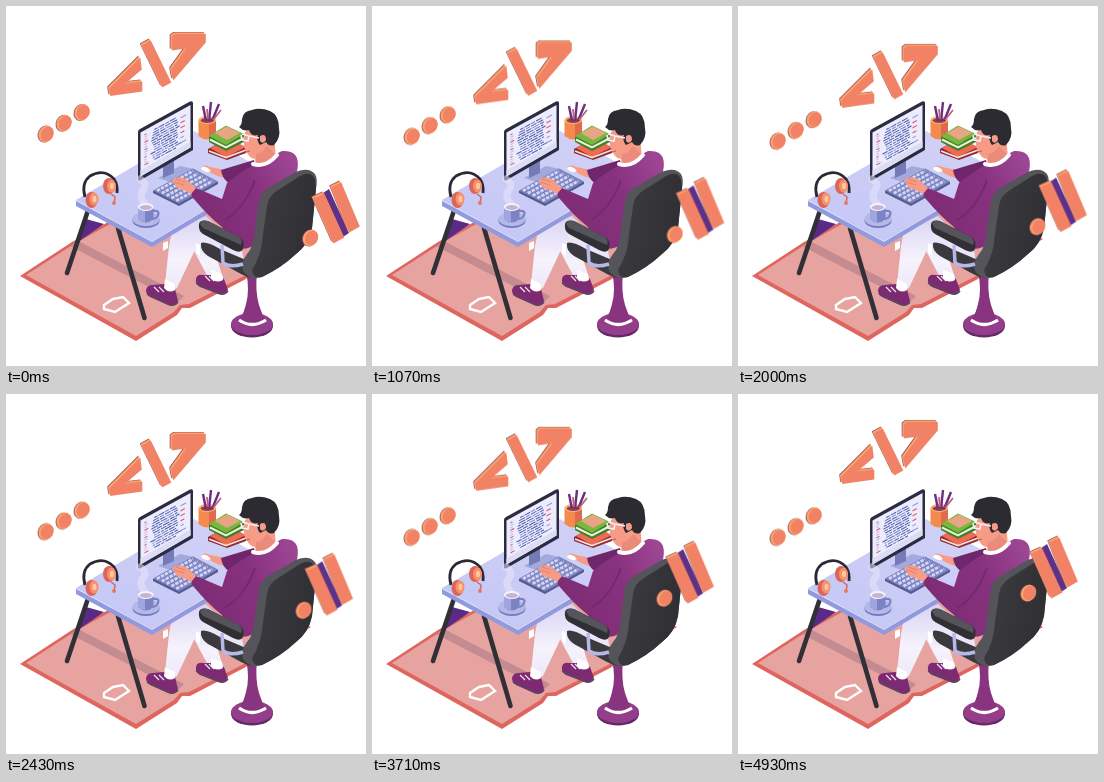
An HTML page that plays this animation: 360x360 px, repeating every 5 s.

```html
<!DOCTYPE html>
<html lang="en">
<head>
<meta charset="utf-8">
<title>Developer at a desk</title>
<style>
  html, body { margin: 0; width: 100%; height: 100%; overflow: hidden; background: #fff; }
  svg { display: block; width: 100vw; height: 100vh; }
  .tag, .dots, .bars { animation: 5s infinite; }
  .tag { animation-name: bob; }
  .dots { animation-name: sink; }
  .bars { animation-name: rise; }
  @keyframes bob {
    0% { transform: none; animation-timing-function: cubic-bezier(.39, .575, .565, 1); }
    46% { transform: translateY(12px); animation-timing-function: cubic-bezier(.45, 0, .72, .82); }
    96%, 100% { transform: none; }
  }
  @keyframes sink {
    0% { transform: none; animation-timing-function: cubic-bezier(.364, 0, .636, 1); }
    86% { transform: translateY(16px); animation-timing-function: ease-in; }
    100% { transform: translateY(15.2px); }
  }
  @keyframes rise {
    0% { transform: none; animation-timing-function: cubic-bezier(.364, 0, .636, 1); }
    100% { transform: translate(-14px, -33px); }
  }
</style>
</head>
<body>
<svg viewBox="0 0 360 360" xmlns="http://www.w3.org/2000/svg">
  <defs>
    <linearGradient id="desk" x1="0" y1="1" x2="1" y2="0">
      <stop offset="0" stop-color="#c3c7f5"/><stop offset="1" stop-color="#d3d2f7"/>
    </linearGradient>
    <linearGradient id="shirt" x1="0" y1=".7" x2="1" y2=".2">
      <stop offset="0" stop-color="#7c2b72"/><stop offset=".6" stop-color="#88327f"/><stop offset="1" stop-color="#9d4694"/>
    </linearGradient>
    <linearGradient id="chair" x1="0" y1="0" x2="1" y2=".3">
      <stop offset="0" stop-color="#3d3c41"/><stop offset="1" stop-color="#302f34"/>
    </linearGradient>
    <linearGradient id="leg" x1="0" y1="0" x2="0" y2="1">
      <stop offset="0" stop-color="#d9d3f3"/><stop offset=".6" stop-color="#f6f3fd"/><stop offset="1" stop-color="#eee7f7"/>
    </linearGradient>
  </defs>

  <g id="rug">
    <path d="M14 270L66 236L189 168L305 233L238 274L184 302L176 302L171 309L130 335Z" fill="#df665f"/>
    <path d="M20 269L68 238L189 171L299 232L236 271L183 298L174 299L168 306L130 330Z" fill="#e6a3a0"/>
    <path d="M64 240L72 235L178 290L172 296Z" fill="#c48b90"/>
    <path d="M98 299L107 293L117 291L123 297L109 306L98 303Z" fill="none" stroke="#fff" stroke-width="2.4"/>
  </g>

  <g id="frame" fill="none" stroke="#313037" stroke-width="4.6" stroke-linecap="round">
    <path d="M80 213L98 218L72 236Z" fill="#5b2a86" stroke="none"/>
    <path d="M81.500 206L61 267M112 222L138.500 312"/>
  </g>

  <g id="legs">
    <path d="M188 226L222 232L210 250L217 272Q210 279 203 273L187 243Z" fill="url(#leg)"/>
    <path d="M166 224L200 210L216 226Q194 238 188 246L171 282Q164 285 159 278L163 240Z" fill="url(#leg)"/>
    <path d="M157 237v8l5-3v-7zM190 237v10l4 3v-11z" fill="#fff"/>
  </g>
  <g id="shoes" fill="#7d2a72">
    <path d="M140 284Q141 279 147 279L158 278L169 283L172 295Q169 301 162 299L144 291Q140 289 140 284Z"/>
    <path d="M190 273Q191 268 197 269L207 269L218 273L222 284Q219 289 212 288L194 281Q189 278 190 273Z"/>
    <path d="M141 288L162 298Q168 301 172 296M190 277L212 287Q218 290 222 285" fill="none" stroke="#59455f" stroke-width="1.600"/>
    <path d="M148 281l5 5M153 281l5 5M199 270l5 5M203 270l5 5" stroke="#f3e6f3" stroke-width="1.200"/>
    <path d="M159 273L169 278L169 284Q163 288 158 282ZM205 264L216 268L217 274Q210 278 205 272Z" fill="#fff"/>
  </g>

  <g id="table">
    <path d="M70 194L146 235L262 166V172L146 241L70 200Z" fill="#929adf"/>
    <path d="M70 194L188 125L262 166L146 235Z" fill="url(#desk)"/>
    <path d="M70 194.500L146 235.500L262 166.500" fill="none" stroke="#e2e4fb" stroke-width="1"/>
  </g>

  <g id="monitor">
    <path d="M152 172L174 160L188 163L164 176Z" fill="#a3a9dc"/>
    <path d="M157 160L168 154V167L157 172Z" fill="#747cb7"/>
    <path d="M132 126Q132 124 134 123L184 95.500Q187 94.500 187 97V144L134 174.500Q132 175 132 173Z" fill="#2b2c42"/>
    <path d="M134.500 126.500L184.500 99V141.500L134.500 170.500Z" fill="#ececfc"/>
    <path d="M134.500 164.500L184.500 135.500V141.500L134.500 170.500Z" fill="#dcdcf4"/>
    <g id="code" transform="matrix(1 -.54 0 1 134.500 126)" stroke-width="1.100" fill="none"/>
  </g>

  <g id="keyboard">
    <path d="M147 185L187 163L212 176V178L173 200L147 187Z" fill="#555b91"/>
    <path d="M147 184.500L187 162.500L212 175.500L173 197.500Z" fill="#7d84bf"/>
    <g id="keys" stroke="#d3d6f6" stroke-width="2.700" stroke-dasharray="3.400 1.100"/>
  </g>

  <g id="phones">
    <path d="M79 191Q75 177 84 170Q98 162 108 173Q112 179 111 187" fill="none" stroke="#2c2937" stroke-width="2.800"/>
    <g fill="#d9655c"><ellipse cx="85.500" cy="194" rx="6" ry="8"/><ellipse cx="103" cy="180" rx="6" ry="8"/></g>
    <g fill="#f99068"><ellipse cx="88" cy="193" rx="4.500" ry="6.500"/><ellipse cx="105.500" cy="180" rx="4.500" ry="6.500"/></g>
    <g fill="#ffc8a4"><ellipse cx="88.500" cy="193" rx="2" ry="3.200"/><ellipse cx="106" cy="180" rx="2" ry="3.200"/></g>
    <path d="M105 188L109 191L108 198" fill="none" stroke="#d9655c" stroke-width="1.500"/>
    <circle cx="108" cy="197" r="2" fill="#e9775f"/>
  </g>

  <g id="cup">
    <path d="M139 198Q132 190 137 184T134 173" fill="none" stroke="#e9e6f9" stroke-width="7" stroke-linecap="round" opacity=".55"/>
    <ellipse cx="140" cy="214.500" rx="13.500" ry="7.500" fill="#6f77b8"/>
    <ellipse cx="140" cy="213" rx="13.500" ry="7.300" fill="#b3b8e8"/>
    <path d="M147 205Q154 204 152 209Q151 213 145 213" fill="none" stroke="#7a82c0" stroke-width="2.200"/>
    <path d="M132 201V213Q140 220 147.500 213V201Z" fill="#7b83c4"/>
    <path d="M132 201V213Q135 216 139 216V201Z" fill="#9fa6df"/>
    <ellipse cx="139.800" cy="201" rx="8" ry="4" fill="#f3f3fe"/>
    <ellipse cx="139.800" cy="201.500" rx="6" ry="2.600" fill="#c6b3d2"/>
  </g>

  <g id="pencils">
    <path d="M192.500 114V130Q201 137 210 130V114Z" fill="#f58a4f"/>
    <path d="M203 116H210V130Q207 133 203 133.500Z" fill="#df6a4c"/>
    <ellipse cx="201.200" cy="114" rx="8.800" ry="4" fill="#ffb067"/>
    <ellipse cx="201.200" cy="114.500" rx="6.500" ry="2.500" fill="#8c3f55"/>
    <path d="M200 115L197 100M203 115L205 96M206 115L213 98" stroke="#6a2f83" stroke-width="2.400"/>
    <path d="M202 113L201 103M207 114L215 104" stroke="#c0607a" stroke-width="1.800"/>
  </g>
  <g id="books">
    <path d="M202 143L222 132L240 142V147L221 154L202 147Z" fill="#8f2a38"/>
    <path d="M204 142L222 132L240 141L220 151Z" fill="#ef6b52"/>
    <path d="M203 145L220 151.500L240 144" fill="none" stroke="#fbe1d4" stroke-width="1.800"/>
    <path d="M203 131L220 120L238 129V136L220 145L203 136Z" fill="#3f7f2b"/>
    <path d="M203 130L220 119.500L238 128L220 139Z" fill="#78b83e"/>
    <path d="M204 133.500L220 141.500L238 132" fill="none" stroke="#eaf3d2" stroke-width="2"/>
    <path d="M209 127L221 120.500L234 127L221 134Z" fill="#e8a585"/>
  </g>

  <g id="person">
    <path d="M196 161Q199 158 204 161L219 164L218 172Q207 169 201 164Z" fill="#f69b86"/>
    <path d="M195 163Q196 159 202 162L205 165Q200 168 195 163Z" fill="#fff"/>
    <path d="M215 164L248 154L252 170L224 178Q216 173 215 164Z" fill="#6f266b"/>
    <path d="M246 160Q250 154 262 152L276 145Q288 144 291 152Q295 166 280 190L250 238Q238 247 224 239L216 221Q203 211 187 192Q183 187 190 182L216 193L221 177Q236 165 246 160Z" fill="url(#shirt)"/>
    <path d="M249 174Q239 202 219 214" fill="none" stroke="#722a6e" stroke-width="2"/>
    <path d="M166 174Q172 169 180 173L190 182L185 188Q179 184 171 182Z" fill="#f69b86"/>
    <path d="M168 176L178 179M170 173L179 176" stroke="#de7b70" stroke-width=".8"/>
    <path d="M239 126Q236 139 240 145Q243 152 249 153L250 159Q260 163 270 152L268 130L252 119Z" fill="#f69b86"/>
    <path d="M250 148Q257 147 261 140L269 148Q263 158 250 158Z" fill="#ea8b7b"/>
    <path d="M247 158Q260 162 271 149" fill="none" stroke="#fff" stroke-width="4" stroke-linecap="round"/>
    <path d="M233 121Q236 119 236 113Q237 105 246 104Q254 101 264 105Q273 109 273 122Q275 132 268 139Q263 141 260 136L254 139Q250 134 252 129Q245 131 243 124Q238 126 233 121Z" fill="#2c2b31"/>
    <path d="M254 130Q260 127 260 134Q257 139 254 135Z" fill="#f69b86"/>
    <path d="M236 128L243 130L253 132M235 129L236 134L242 135L243 130" fill="none" stroke="#f4f0fa" stroke-width="1.600"/>
    <path d="M240 146L244 145" stroke="#bd5b58" stroke-width="1"/>
  </g>

  <g id="seat">
    <path d="M240 266H251Q249 286 253 299L258 313H236L240 298Q244 284 240 266Z" fill="#88347f"/>
    <ellipse cx="246" cy="320" rx="21" ry="11.500" fill="#64276a"/>
    <ellipse cx="246" cy="318" rx="21" ry="11" fill="#933d8b"/>
    <path d="M241 298Q238 306 234 313Q246 321 259 313Q253 304 251 296Z" fill="#88347f"/>
    <path d="M233 314Q246 323 260 314" fill="none" stroke="#fff" stroke-width="3.200"/>
    <path d="M195 226L236 244L238 257L197 240Z" fill="#eae6f8"/>
    <path d="M195 237Q200 235 214 243L240 254L262 262Q250 277 235 268L202 250Q194 245 195 237Z" fill="#3a393e"/>
    <path d="M253 194Q255 185 267 179L288 167Q302 160 309 168Q312 173 310 183L306 222Q303 238 290 248Q275 262 256 271Q244 275 237 265Q234 257 241 248Q248 241 249 222Z" fill="#55545a"/>
    <path d="M261 200Q262 190 272 184L294 170Q306 164 309 174L310 183L306 222Q303 238 290 248Q275 262 256 271Q247 273 246 264Q256 248 257 228Z" fill="url(#chair)"/>
    <path d="M216 239L217 257Q224 262 237 258" fill="none" stroke="#b6b9e8" stroke-width="3.500" stroke-linejoin="round"/>
    <path d="M193 218Q194 213 202 215L233 231Q239 234 237 243Q235 248 227 244L197 228Q192 225 193 218Z" fill="#302f34"/>
    <path d="M194 218Q196 213 202 215L233 231Q237 234 235 239L197 222Z" fill="#55545a"/>
  </g>

  <g class="tag" id="tag"></g>
  <g class="dots" id="dots"></g>
  <g class="bars" id="bars"></g>
</svg>
<script>
  const NS = 'http://www.w3.org/2000/svg';
  const add = (id, name, attrs) => {
    const el = document.createElementNS(NS, name);
    for (const key in attrs) el.setAttribute(key, attrs[key]);
    document.getElementById(id).append(el);
  };

  // Raised slab: dark rim, bright bevel, then the front face.
  const slab = (id, d) => {
    const layer = (fill, x, y) => add(id, 'path', { d, fill, transform: `translate(${x} ${y})` });
    layer('#9c5074', -.8, -.6);
    layer('#fba562', 0, 0);
    layer('#f18265', 1.3, 1.6);
  };
  const disc = (id, cx, cy) => {
    const layer = (fill, x, rx, ry) =>
      add(id, 'ellipse', { cx: 0, cy: 0, rx, ry, fill, transform: `translate(${cx + x} ${cy}) rotate(28)` });
    layer('#9c5074', -.8, 7.3, 8.8);
    layer('#fba562', 0, 7.3, 8.5);
    layer('#f18265', 1.2, 6.2, 7.6);
  };

  slab('tag', 'M133 50L134.500 62L118 76L135 74V84L103 88.500L102 81Z');
  slab('tag', 'M134.500 38L143.500 33L164 75L155 80Z');
  slab('tag', 'M164.500 29L168 26.500H198.500V35L166 73L164 62L179 41L164.500 43Z');
  for (let i = 0; i < 3; i++) disc('dots', 40 + 18 * i, 128 - 10.8 * i);

  add('bars', 'path', { d: 'M317 187L323 183L343 227L337 231Z', fill: '#5c3187' });
  slab('bars', 'M306 191L317 186L337 230L326 236Z');
  slab('bars', 'M324 180L334 175L352.500 219L342 225Z');
  disc('bars', 304.500, 232);

  let seed = 7;
  const rand = () => (seed = seed * 16807 % 2147483647) / 2147483647;
  const dash = (x, y, len, stroke) => add('code', 'path', { d: `M${x} ${y}h${len}`, stroke });
  for (let row = 0; row < 13; row++) {
    const y = 5 + row * 2.500;
    dash(4, y, 2 + rand() * 2, row % 3 ? '#b9bfec' : '#e0526b');
    for (let x = 10 + rand() * 4; x < 36;) {
      const len = 2 + rand() * 5;
      dash(x, y, len, rand() < .7 ? '#4b5cad' : '#7c86cf');
      x += len + 1;
    }
    if (row % 2) dash(40, y, 2 + rand() * 4, rand() < .6 ? '#e0526b' : '#8f9ade');
  }

  for (let i = 0; i < 5; i++) {
    const x = 151 + i * 4.800, y = 184.800 + i * 2.500;
    add('keys', 'path', { d: `M${x} ${y}l36 -19.800` });
  }
</script>
</body>
</html>
```
